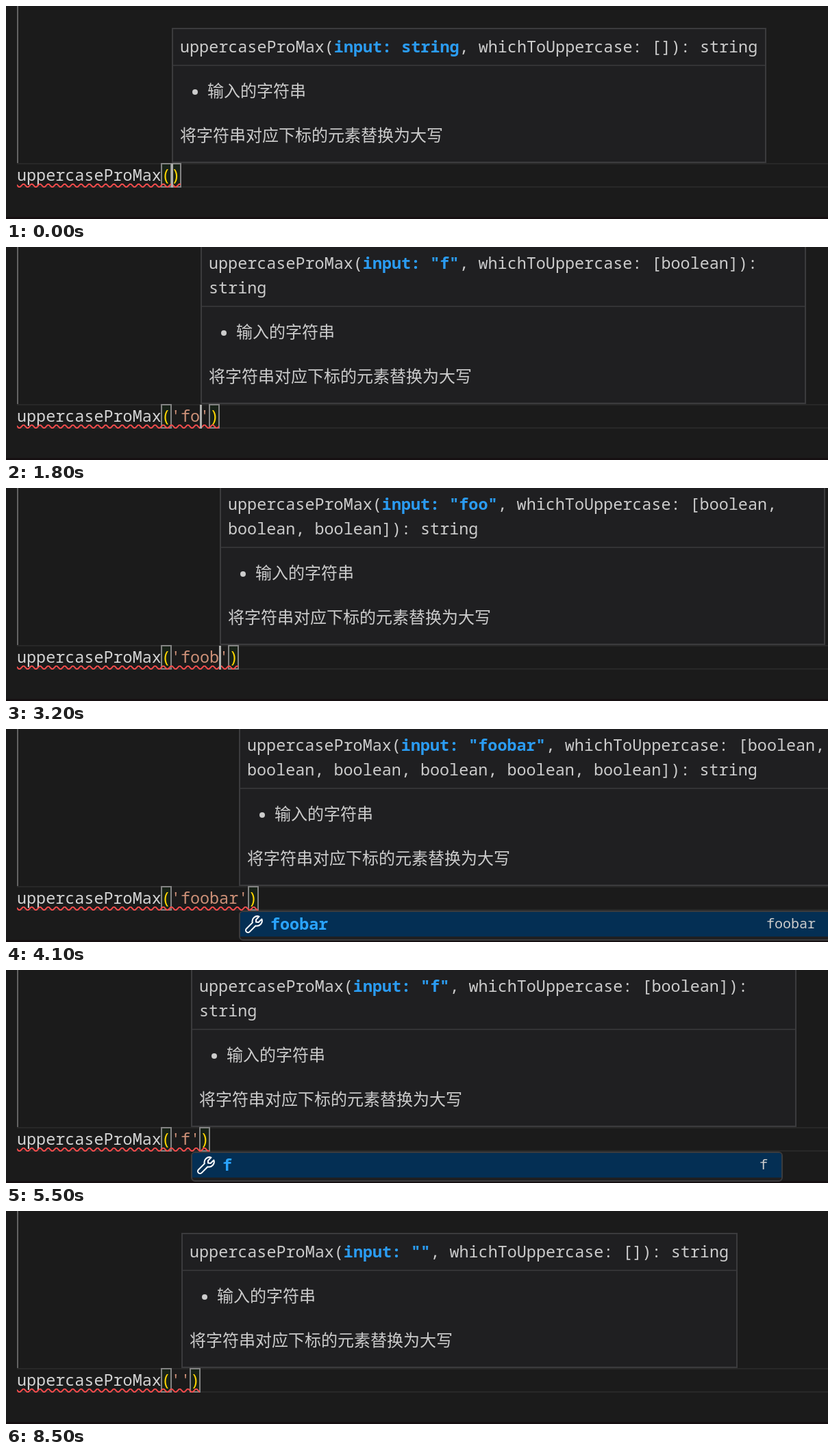
These frames come from a looping animation (1200 px wide and 312 px high, 8600 ms). An HTML page:

```html
<!DOCTYPE html>
<html lang="zh-CN">
<head>
<meta charset="utf-8">
<title>uppercaseProMax</title>
<style>
  html, body { margin: 0; width: 100%; height: 100%; overflow: hidden; background: #1b1b1b; }
  #stage {
    position: relative; width: 1200px; height: 312px; overflow: hidden;
    background: #1b1b1b; color: #ccc;
    font: 500 23.4375px/36px "Noto Sans Mono", monospace;
    font-variant-ligatures: none;
  }
  #stage div, #stage svg { position: absolute; box-sizing: border-box; }
  .guide { left: 16px; top: 0; width: 2px; height: 230px; background: #636363; }
  .line { left: 16px; top: 230px; width: 1190px; height: 36px; border: 2px solid #282828; border-left: 0; }
  .floor { left: 0; top: 309px; width: 1200px; height: 3px; background: #161012; }
  .code { left: 16px; top: 229px; white-space: pre; color: #d4d4d4; }
  .code b { font-weight: 500; color: #ffd700; }
  .code i { font-style: normal; color: #ce9178; }
  .match { top: 230px; width: 16px; height: 36px; border: 2px solid #838383; background: rgba(0, 100, 0, .1); }
  #wave { left: 16px; top: 260px; height: 6px; overflow: hidden; }
  #caret { top: 231px; width: 3px; height: 35px; background: #aeafad; }
  #hint {
    bottom: 82px; width: max-content; max-width: 884px;
    border: 2px solid #3b3b3d; background: #1f1f21;
  }
  #hint p { margin: 0; padding: 7px 11px 9px 10px; border-bottom: 2px solid #333335; }
  #hint section { height: 140px; }
  #hint section div { left: 10px; white-space: nowrap; font: 500 24px/36px "Noto Sans CJK SC", "Noto Sans CJK", sans-serif; }
  #hint em { font-style: normal; font-weight: 600; color: #2b9cf2; }
  #hint .dot { left: 28px; bottom: 98px; width: 8px; height: 8px; border-radius: 4px; background: #ccc; }
  #list {
    top: 266px; width: 864px; height: 44px; overflow: hidden;
    border: 2px solid #3b3b3d; border-radius: 6px; background: #1f1f21;
  }
  #list .row { left: 0; top: 0; width: 860px; height: 36px; background: #042f54; }
  #list svg { left: 6px; top: 4px; }
  #name { left: 44px; top: -1px; color: #2aa4ff; font-weight: 600; }
  #detail { right: 20px; top: -1px; font-size: 20px; }
</style>
</head>
<body>
<div id="stage">
  <div class="guide"></div>
  <div class="line"></div>
  <div class="floor"></div>
  <div class="match" id="open"></div>
  <div class="match" id="close"></div>
  <div class="code">uppercaseProMax<b>(</b><i id="arg"></i><b>)</b></div>
  <svg id="wave" height="6"><path fill="none" stroke="#f14c4c" stroke-width="2"/></svg>
  <div id="hint">
    <p>uppercaseProMax(<em id="param"></em><span id="rest"></span></p>
    <section>
      <div class="dot"></div>
      <div style="left:50px; bottom:87px">输入的字符串</div>
      <div style="bottom:22px">将字符串对应下标的元素替换为大写</div>
    </section>
  </div>
  <div id="list">
    <div class="row">
      <svg width="28" height="28" fill="none" stroke="#fff" stroke-width="2" stroke-linejoin="round">
        <path d="M21.5 2.6A7.5 7.5 0 0 0 11.8 11.6L3 20.5a3.2 3.2 0 0 0 4.6 4.6L16.4 16.2A7.5 7.5 0 0 0 25.4 6.5L20.8 11L17 10.8L17 7.2Z"/>
      </svg>
      <div id="name"></div>
      <div id="detail"></div>
    </div>
  </div>
  <div id="caret"></div>
</div>
<script>
const LOOP = 8600, LAG = 300, BLINK = 500;
const CHAR = 14.0625, LEFT = 16, OPEN = LEFT + 15 * CHAR;
const $ = id => document.getElementById(id);

// Typing: [time, text between the quotes]; null means no quotes yet.
const edits = [
  [0, null], [500, ''], [1200, 'f'], [1800, 'fo'], [2300, 'foo'],
  [3100, 'foob'], [3300, 'fooba'], [3500, 'foobar'],
  [4200, 'fooba'], [4400, 'foob'], [4600, 'foo'], [4800, 'fo'],
  [5000, 'f'], [5600, '']
];
const editAt = t => edits.filter(e => e[0] <= Math.max(t, 0)).pop();

let zigzag = 'M-2.4 0';
for (let x = 3.6; x < 420; x += 12) zigzag += `L${x} 6L${x + 6} 0`;
document.querySelector('#wave path').setAttribute('d', zigzag);
$('open').style.left = OPEN - 1 + 'px';

function showHint(text) {
  const type = text === null ? 'string' : `"${text}"`;
  const flags = Array((text || '').length).fill('boolean').join(', ');
  $('param').textContent = 'input: ' + type;
  $('rest').textContent = `, whichToUppercase: [${flags}]): string`;
}

function showCode(text) {
  const arg = text === null ? '' : `'${text}'`;
  const end = OPEN + (1 + arg.length) * CHAR;
  const caret = text === null ? end : end - CHAR;
  $('arg').textContent = arg;
  $('close').style.left = end - 1 + 'px';
  $('wave').style.width = end + CHAR - LEFT + 'px';
  $('caret').style.left = caret + 'px';
  $('hint').style.left = $('list').style.left = Math.round(caret + 1) + 'px';
  $('name').textContent = $('detail').textContent = text;
}

let shown = '';
function draw() {
  const t = performance.now() % LOOP;
  const [time, text] = editAt(t);
  const [knownTime, known] = editAt(t - LAG);
  const caretOn = text === null || Math.floor((t - time) / BLINK) % 2 === 0;
  const key = [time, knownTime, caretOn].join();
  if (key !== shown) {
    shown = key;
    showCode(text);
    showHint(known);
    $('caret').style.visibility = caretOn ? 'visible' : 'hidden';
    $('list').style.visibility = text && t - time >= LAG ? 'visible' : 'hidden';
  }
  requestAnimationFrame(draw);
}
draw();
</script>
</body>
</html>
```
